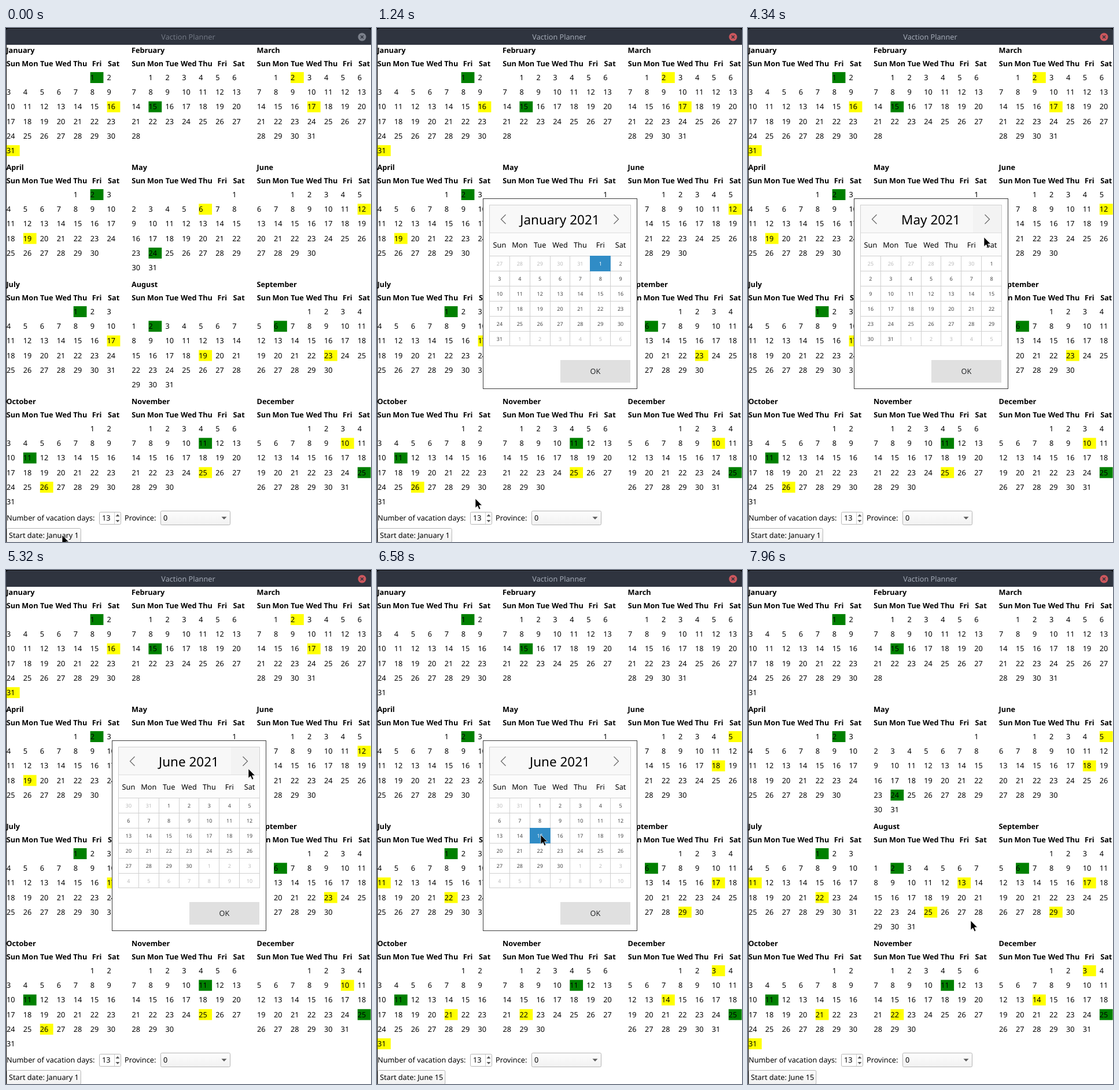
Recreate the animation shown at these times as an HTML page. Size 631 by 887 pixels, loop 8000 ms.

```html
<!DOCTYPE html>
<html lang="en">
<head>
<meta charset="utf-8">
<title>Vaction Planner</title>
<style>
  html, body { margin: 0; width: 100%; height: 100%; overflow: hidden; background: #000; }
  svg { display: block; width: 631px; height: 887px; font: 12.7px "Noto Sans", sans-serif; }
  text { white-space: pre; text-rendering: geometricPrecision; }
  .b { font-weight: bold; }
  .mid { text-anchor: middle; }
  .day { font-size: 9px; text-anchor: middle; }
</style>
</head>
<body>
<svg viewBox="0 0 631 887">
  <defs>
    <linearGradient id="face" x2="0" y2="1">
      <stop stop-color="#fdfdfd"/><stop offset="1" stop-color="#f1f1f1"/>
    </linearGradient>
    <linearGradient id="dark">
      <stop stop-color="#e3e3e3"/><stop offset="1" stop-color="#f1f1f1"/>
    </linearGradient>
  </defs>
  <rect x="1" y="29" width="630" height="858" fill="#fff"/>
  <path d="M0 29V5Q0 1 4 1H627Q631 1 631 5V29Z" fill="#2f343f"/>
  <path d="M4 1.5H627" stroke="#3b404c"/>
  <text id="title" class="mid" x="315" y="20">Vaction Planner</text>
  <circle id="close" cx="615.5" cy="15.5" r="7"/>
  <path d="M613 13l5 5m0-5l-5 5" stroke="#2f343f" stroke-width="1.6"/>
  <g id="year"></g>
  <g stroke="#b4b4b4">
    <rect x="161.5" y="835.5" width="37" height="21" rx="2" fill="#fff"/>
    <path d="M187.5 836V856" stroke="#d0d0d0"/>
    <rect x="267.5" y="833.5" width="120" height="24" rx="2" fill="url(#face)"/>
    <rect id="button" x="1.5" y="863.5" height="24" rx="2"/>
  </g>
  <path d="M189.5 843l3.5-4 3.5 4zM189.5 849l3.5 4 3.5-4zM372.5 843.5h9l-4.5 4.5z" fill="#5a5a5a"/>
  <text x="1" y="850">Number of vacation days:</text>
  <text x="166" y="850">13</text>
  <text x="205" y="850">Province:</text>
  <text x="272" y="850">0</text>
  <text id="start" x="5" y="880"></text>
  <g id="popup">
    <rect x="183.5" y="294.5" width="266" height="328" fill="#fff" stroke="#3c3c3c"/>
    <rect x="195" y="306" width="243" height="47" fill="#f8f8f8"/>
    <rect id="next" x="389" y="306" width="49" height="47"/>
    <rect x="195" y="354" width="243" height="39" fill="#fcfcfc"/>
    <path d="M195 353.5H438" stroke="#dedede"/>
    <path d="M222.5 322l-8 8 8 8M409.5 322l8 8-8 8" fill="none" stroke="#6c6c6c" stroke-width="1.3"/>
    <text id="month" class="mid" x="316" y="339" font-size="22.5"></text>
    <g id="days"></g>
    <rect id="ok" x="317" y="573" width="121" height="39"/>
    <text class="mid" x="377.5" y="597" fill="#26282a">OK</text>
  </g>
  <path id="cursor" d="M0 0V16.3L3.8 12.8 6.4 18.7 9 17.6 6.5 11.8H11.6Z" stroke="#fff" stroke-width=".7"/>
</svg>
<script>
const $ = id => document.getElementById(id);
const set = (id, attr, value) => $(id).setAttribute(attr, value);
const text = (x, y, s, attrs = '') => `<text x="${x}" y="${y}" ${attrs}>${s}</text>`;
const rect = (x, y, w, h, fill) => `<rect x="${x}" y="${y}" width="${w}" height="${h}" fill="${fill}"/>`;

const MONTHS = 'January February March April May June July August September October November December'.split(' ');
const WEEK = 'Sun Mon Tue Wed Thu Fri Sat'.split(' ');
const HOLIDAYS = '1/1 2/15 4/2 5/24 7/1 8/2 9/6 10/11 11/11 12/25'.split(' ');
const VACATION = 13;

const dayOfYear = (m, d) => Math.round((Date.UTC(2021, m, d) - Date.UTC(2021, 0, 1)) / 864e5);
const holidays = HOLIDAYS.map(h => { const [m, d] = h.split('/'); return dayOfYear(m - 1, d); });

// Keep splitting the longest stretch between holidays, then space the days off evenly in it
function planDays(start) {
  const gaps = holidays.slice(1)
    .map((end, i) => ({ from: holidays[i], length: end - holidays[i], parts: 1 }))
    .filter(g => g.from + g.length > start);
  for (let i = 0; i < VACATION; i++)
    gaps.reduce((a, b) => b.length / b.parts > a.length / a.parts ? b : a).parts++;
  return gaps.flatMap(g => Array.from({ length: g.parts - 1 },
    (_, k) => g.from + Math.floor(g.length * (k + 1) / g.parts)));
}

function drawYear(m0, d0) {
  const plan = planDays(dayOfYear(m0, d0));
  let out = '';
  MONTHS.forEach((name, m) => {
    const x0 = .9 + m % 3 * 216.6, y0 = Math.floor(m / 3) * 202;
    // A month that begins on Sunday leaves its first row empty
    const first = new Date(2021, m, 1).getDay() || 7, count = new Date(2021, m + 1, 0).getDate();
    out += text(x0 - .5, y0 + 43, name, 'class="b"');
    WEEK.forEach((w, i) => out += text(x0 + 11.6 + 28.93 * i, y0 + 66, w, 'class="b mid"'));
    for (let d = 1; d <= count; d++) {
      const cell = first + d - 1, day = dayOfYear(m, d);
      const x = x0 + cell % 7 * 28.95, y = y0 + 76.1 + Math.floor(cell / 7) * 25.22;
      const fill = holidays.includes(day) ? '#008000' : plan.includes(day) ? '#ff0' : '';
      if (fill) out += rect(x, y, 22.8, 18.9, fill);
      out += text(x, y + 13.8, d);
    }
  });
  $('year').innerHTML = out;
  $('start').textContent = `Start date: ${MONTHS[m0]} ${d0}`;
  set('button', 'width', $('start').getComputedTextLength() + 7);
}

function drawPopup(m, selected) {
  const first = new Date(2021, m, 1).getDay(), w = 34.86, h = 25.9;
  const colX = c => Math.round(194 + w * c) + .5, rowY = r => Math.round(393 + h * r) + .5;
  let out = '', lines = 'M194.5 305.5H438.5';
  $('month').textContent = m === 1 ? 'February 20...' : MONTHS[m] + ' 2021';
  WEEK.forEach((name, i) => out += text(194.5 + w * (i + .5), 379, name, 'class="mid"'));
  for (let i = 0; i < 8; i++) lines += `M${colX(i)} ${i % 7 ? 394 : 305}V549`;
  for (let i = 0; i < 7; i++) lines += `M194 ${rowY(i)}H439`;
  out += `<path d="${lines}" stroke="#d0d0d0"/>`;
  for (let i = 0; i < 42; i++) {
    const date = new Date(2021, m, 1 - first + i), c = i % 7, r = Math.floor(i / 7);
    const inside = date.getMonth() === m, on = inside && date.getDate() === selected;
    if (on) out += rect(colX(c) - .5, rowY(r) - .5, w + 1, h + 1, '#308cc6');
    const fill = on ? '#fff' : inside ? '#444' : '#bbb';
    out += text(194.5 + w * (c + .5), 394 + h * (r + .5) + 3.3, date.getDate(), `class="day" fill="${fill}"`);
  }
  $('days').innerHTML = out;
}

// Pointer moves: from, to (ms), end x, end y, downward sag of the path
const MOVES = [
  [920, 1240, 170, 812, 0],
  [2540, 2780, 404, 331, 0],
  [4180, 5020, 419, 343, 38],
  [5360, 5440, 406, 365, 0],
  [5580, 6320, 283, 457, 98],
  [6660, 7260, 376, 604, 0],
  [7860, 7960, 385, 605, 0]
];
const TICK = 72;

function pointer(t) {
  let x = 97, y = 875;
  for (const [from, to, x1, y1, sag] of MOVES) {
    if (t < from) break;
    const ticks = ms => Math.floor(ms / TICK) + 1;
    const p = Math.min(1, ticks(t - from) / ticks(to - from));
    x += (x1 - x) * p;
    y += (y1 - y) * p + sag * Math.sin(Math.PI * p);
  }
  return [Math.round(x), Math.round(y)];
}

const CLICKS = [2920, 3360, 3760, 3920, 5200];
let last = '';

function frame(now) {
  const t = now % 8000, within = (a, b) => t >= a && t < b;
  const month = CLICKS.filter(c => t >= c).length, picked = t >= 6440;
  const key = month + ' ' + picked;
  if (key !== last) {
    last = key;
    drawYear(picked ? 5 : 0, picked ? 15 : 1);
    drawPopup(month, picked ? 15 : month ? 0 : 1);
  }
  set('title', 'fill', t < 700 ? '#717783' : '#a3aab6');
  set('close', 'fill', t < 700 ? '#7b808b' : '#cc575d');
  set('button', 'fill', within(720, 860) ? '#d8d8d8' : 'url(#face)');
  set('popup', 'visibility', within(860, 7720) ? 'visible' : 'hidden');
  set('next', 'fill', within(2920, 3920) ? 'url(#dark)' : within(2780, 5440) ? '#f3f3f3' : 'none');
  set('ok', 'fill', within(7580, 7720) ? '#cecece' : '#e0e0e0');
  set('cursor', 'transform', `translate(${pointer(t)})`);
  requestAnimationFrame(frame);
}
requestAnimationFrame(frame);
</script>
</body>
</html>
```
